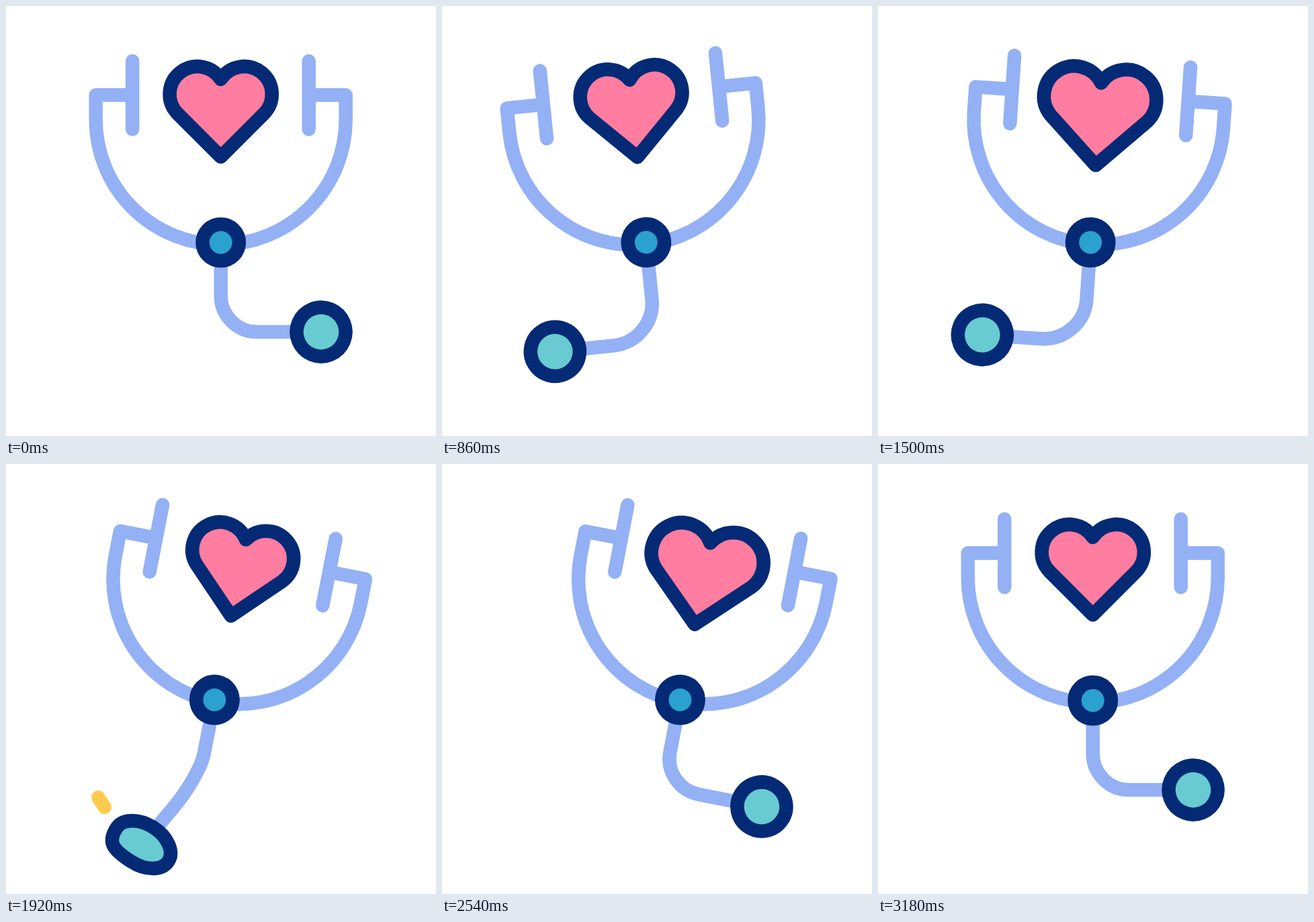
An HTML page with a canvas for the animation above (3.2 s loop, 640 by 640 pixels).

```html
<!DOCTYPE html>
<html lang="en">
<head>
<meta charset="utf-8">
<title>Stethoscope</title>
<style>
html, body { margin: 0; width: 100%; height: 100%; overflow: hidden; background: #fff; }
canvas { display: block; width: 640px; height: 640px; }
</style>
</head>
<body>
<canvas width="640" height="640"></canvas>
<script>
const ctx = document.querySelector('canvas').getContext('2d');
const LOOP = 3200, HALF = LOOP / 2, BEAT = LOOP / 3, RAD = Math.PI / 180;
const NAVY = '#052a75', BLUE = '#94b1f5', PINK = '#ff7da0';
const CYAN = '#2aa1ce', TEAL = '#67cbd1', YELLOW = '#ffcb4e';

const lerp = (a, b, u) => a + (b - a) * u;
const progress = (t, from, to) => Math.min(1, Math.max(0, (t - from) / (to - from)));
const ease = u => (1 - Math.cos(Math.PI * u)) / 2;
const ramp = (t, from, to) => ease(progress(t, from, to));
const pulse = (t, a, b, c, d) => ramp(t, a, b) - ramp(t, c, d);

function paint(path, color, fill) {
  if (fill) {
    ctx.fillStyle = fill;
    ctx.fill(path);
  }
  ctx.strokeStyle = color;
  ctx.stroke(path);
}

const frame = new Path2D(`M188.5 82V183.5M451 82V183.5M188.5 132.5H134V169
  A186 186 0 0 0 506 169V132.5H451`);
const joint = new Path2D();
joint.arc(320, 352, 27.2, 0, 7);

// Grows from its top edge, with the notch sinking deeper.
function heart(grow) {
  const kx = 1 + grow, ky = 1 + 0.75 * grow;
  const x = 64.5 * kx, side = 90 + 70 * ky, notch = 90 + 19 * kx * kx;
  const r = 0.5025 * Math.hypot(x, side - notch);
  return new Path2D(`M320 ${notch}A${r} ${r} 0 1 0 ${320 - x} ${side}
    L320 ${90 + 134.5 * ky}L${320 + x} ${side}A${r} ${r} 0 1 0 320 ${notch}Z`);
}

function tube(p, pull, x, y) {
  const start = lerp(79, 85, p), corner = lerp(133, 148, p) - 35 * pull;
  const bend = lerp(54, 64, p) / Math.hypot(x, y - corner);
  const qx = x * bend, qy = (y - corner) * bend;
  return new Path2D(`M0 0V${start}C0 ${lerp(start, corner, 0.55)}
    ${qx * 0.45} ${corner + qy * 0.45} ${qx} ${corner + qy}L${x} ${y}`);
}

// Round at rest; stretched with a blunt trailing corner while moving.
function bob(pull) {
  const a = 36.5 + 12 * pull, b = 36.5 - 8 * pull, k = 0.552, c = k + 0.3 * pull;
  return new Path2D(`M${a} 0C${a} ${b * c} ${a * c} ${b} 0 ${b}
    C${-a * k} ${b} ${-a} ${b * k} ${-a} 0C${-a} ${-b * k} ${-a * k} ${-b} 0 ${-b}
    C${a * k} ${-b} ${a} ${-b * k} ${a} 0Z`);
}

function trail(t, dir) {
  const head = progress(t, 300, 560), tail = progress(t, 355, 705);
  if (head <= tail) return;
  const angle = u => (90 - dir * (48.5 - 65 * u)) * RAD;
  const path = new Path2D();
  path.arc(0, 50, 189.6, angle(tail), angle(head), dir < 0);
  paint(path, YELLOW);
}

function draw(t) {
  const dir = t < HALF ? 1 : -1;

  // The body leans left, then right, where its slide lags behind its tilt.
  const left = pulse(t, 0, 595, 450, 1330);
  const tilt = 11.1 * pulse(t, 1200, 1950, 2485, 3150) - 10.5 * left;
  const shift = 46.5 * pulse(t, 1873, 2511, 2441, 3203) - 38.3 * left;

  // The chest piece swings from right (0) to left (1) and back.
  const p = ease(progress(t, 0, 740) ** 0.75) - ramp(t, 1624, 2398);
  const pull = Math.max(0, Math.sin(Math.PI * p)) ** 1.5;
  const phi = lerp(48.3, -45.6, p) * RAD;
  const reach = lerp(200, 211.7, p) + 42 * pull;
  const x = reach * Math.sin(phi), y = reach * Math.cos(phi);

  ctx.setTransform(1, 0, 0, 1, 0, 0);
  ctx.fillStyle = '#fff';
  ctx.fillRect(0, 0, 640, 640);
  ctx.lineWidth = 20.5;
  ctx.lineCap = ctx.lineJoin = 'round';
  ctx.translate(319.7 + shift, 300);
  ctx.rotate(tilt * RAD);
  ctx.translate(-320, -300);

  ctx.save();
  ctx.translate(320, 352);
  trail(t % HALF, dir);
  paint(tube(p, pull, x, y), BLUE);
  ctx.translate(x, y);
  ctx.rotate(-1.4 * phi);
  ctx.scale(dir, 1);
  paint(bob(pull), NAVY, TEAL);
  ctx.restore();

  paint(frame, BLUE);
  paint(joint, NAVY, CYAN);
  paint(heart(0.13 * pulse(t % BEAT, 0, 180, 400, 640)), NAVY, PINK);
}

const begin = performance.now();
function tick() {
  draw((performance.now() - begin) % LOOP);
  requestAnimationFrame(tick);
}
tick();
</script>
</body>
</html>
```
